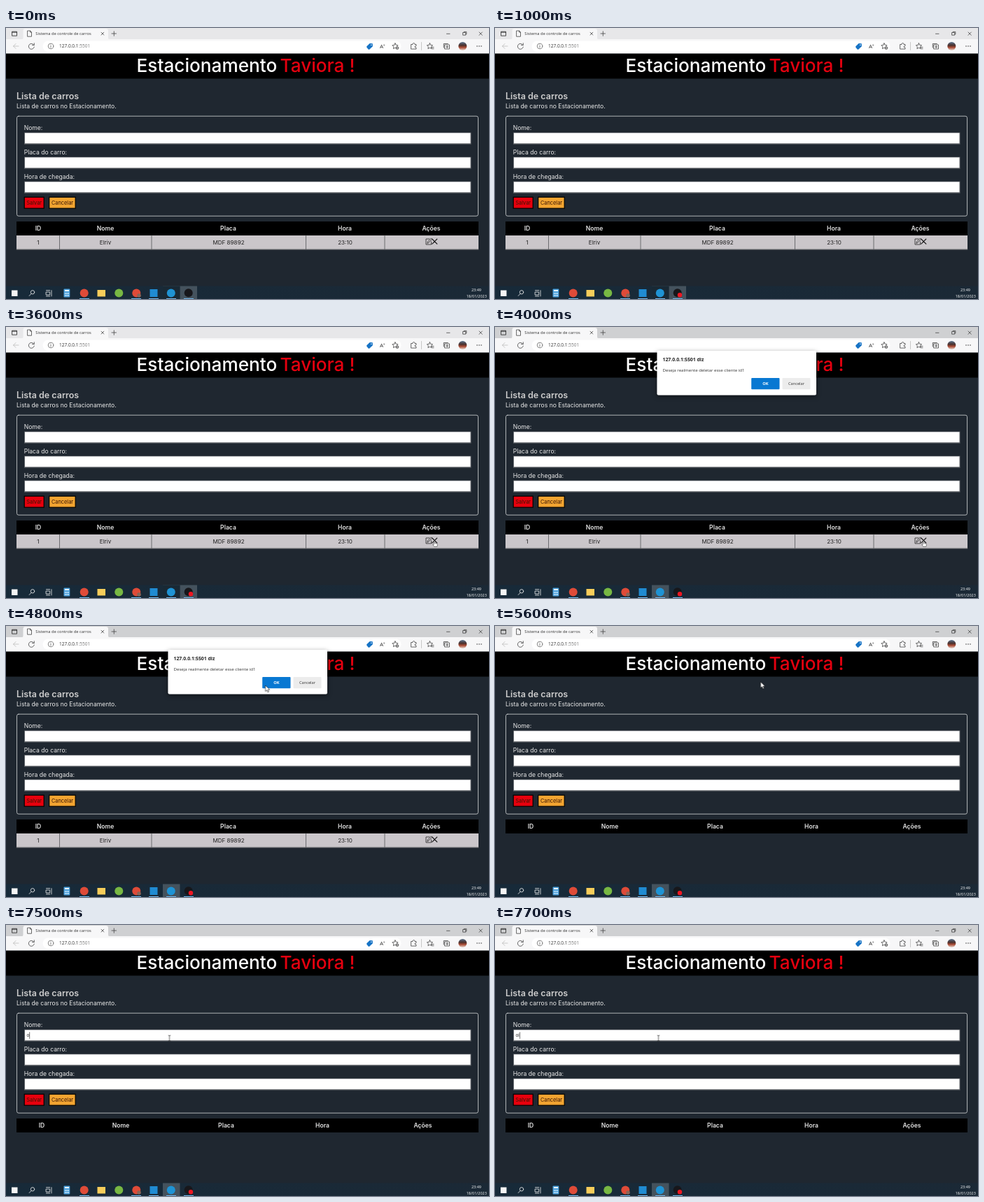
Write an HTML page that moves like this. It is 690x388 px and loops after 8 s.

```html
<!DOCTYPE html>
<html lang="pt-BR">
<head>
<meta charset="utf-8">
<title>Sistema de controle de carros</title>
<style>
  html, body { margin: 0; width: 100%; height: 100%; overflow: hidden; background: #1f2730; }
  svg { display: block; width: 100%; height: 100%; }
  text { font-family: "Open Sans", "Noto Sans", sans-serif; fill: #333; }
  .page text { font-family: Inter, "Open Sans", sans-serif; font-size: 8.6px; fill: #e8e8e8; }
  .page .title { font-size: 26.2px; font-weight: 500; fill: #fff; }
  .page .name { fill: #e3000f; }
  .page .heading { font-size: 12.5px; font-weight: 600; fill: #ccc; }
  .page .head text { font-weight: 600; fill: #e4e4e4; }
  .page .row text { font-size: 8.1px; fill: #222; }
  .page .button { font-size: 7.4px; fill: #3a1505; }
  .mid text, .mid { text-anchor: middle; }
  .line { fill: none; stroke: #444; stroke-width: .8; stroke-linecap: round; stroke-linejoin: round; }
  .pale { stroke: #bbb; }
  .light { stroke: #f2f2f2; }
  .bold { font-weight: 700; }

  /* hard changes */
  .window, .inactive, .before, .after, .badge, .dialog, .pressed, .suggest, .typed, .letter,
  .caret, .arrow, .hand, .beam { animation: 8s step-end infinite; }
  .inactive { animation-name: inactive; }
  .before { animation-name: before; }
  .after { animation-name: after; }
  .badge { animation-name: badge; }
  .dialog { animation-name: dialog; }
  .pressed { animation-name: pressed; }
  .suggest { animation-name: suggest; }
  .typed { animation-name: typed; }
  .letter { animation-name: letter; }
  .caret { animation-name: caret; }
  .arrow { animation-name: arrow; }
  .hand { animation-name: hand; }
  .beam { animation-name: beam; }
  @keyframes inactive { 0% { opacity: 1 } 47.5%, 100% { opacity: 0 } }
  @keyframes before { 0% { opacity: 1 } 67.5%, 100% { opacity: 0 } }
  @keyframes after { 0% { opacity: 0 } 67.5%, 100% { opacity: 1 } }
  @keyframes badge { 0% { opacity: 0 } 1.25%, 100% { opacity: 1 } }
  @keyframes dialog { 0% { opacity: 0 } 50% { opacity: 1 } 67.5%, 100% { opacity: 0 } }
  @keyframes pressed { 0% { opacity: 0 } 65% { opacity: 1 } 67.5%, 100% { opacity: 0 } }
  @keyframes suggest { 0% { opacity: 0 } 78.75% { opacity: 1 } 92.5%, 100% { opacity: 0 } }
  @keyframes typed { 0% { opacity: 0 } 92.5%, 100% { opacity: 1 } }
  @keyframes letter { 0% { opacity: 0 } 95%, 100% { opacity: 1 } }
  @keyframes caret {
    0% { opacity: 0; transform: none } 78.75% { opacity: 1; transform: none }
    88.75% { opacity: 0; transform: none } 92.5% { opacity: 1; transform: translateX(4px) }
    95%, 100% { opacity: 1; transform: translateX(5.8px) }
  }
  @keyframes arrow {
    0% { opacity: 0 } 16.25% { opacity: 1 } 37.5% { opacity: 0 } 51.25% { opacity: 1 } 77.5%, 100% { opacity: 0 }
  }
  @keyframes hand { 0% { opacity: 0 } 37.5% { opacity: 1 } 51.25%, 100% { opacity: 0 } }
  @keyframes beam { 0% { opacity: 0 } 77.5%, 100% { opacity: 1 } }

  .pointer { animation: travel 8s ease-in-out infinite; }
  @keyframes travel {
    0%, 16.25% { transform: translate(420px, 300px) }
    22.5%, 28.75% { transform: translate(370px, 253px) }
    37.5%, 51.25% { transform: translate(612px, 306px) }
    58.75%, 60% { transform: translate(370.5px, 85px) }
    62.5%, 71.25% { transform: translate(379.5px, 80px) }
    77.5%, 100% { transform: translate(233.5px, 162px) }
  }
</style>
</head>
<body>
<svg viewBox="0 0 690 388" xmlns="http://www.w3.org/2000/svg">
  <defs>
    <linearGradient id="bar"><stop stop-color="#172a39"/><stop offset="1" stop-color="#1b2936"/></linearGradient>
    <linearGradient id="photo" x2="0" y2="1">
      <stop stop-color="#5c7590"/><stop offset=".4" stop-color="#49302c"/><stop offset=".65" stop-color="#a94a34"/><stop offset="1" stop-color="#e5d5cc"/>
    </linearGradient>
    <filter id="shadow" x="-10%" y="-20%" width="120%" height="150%">
      <feDropShadow dx="0" dy="2" stdDeviation="3" flood-opacity=".5"/>
    </filter>
    <g id="field">
      <rect x="26" width="638.5" height="17" fill="#5e6267"/>
      <rect x="27" y=".7" width="636.5" height="14.9" fill="#fff"/>
    </g>
  </defs>

  <!-- web page -->
  <rect width="690" height="388" fill="#1f2730"/>
  <g class="page">
    <rect y="36.5" width="690" height="36" fill="#000"/>
    <text class="title" x="186.5" y="63">Estacionamento</text>
    <text class="title name" x="391.5" y="63">Taviora !</text>
    <text class="heading" x="15" y="101.5">Lista de carros</text>
    <text x="15" y="115">Lista de carros no Estacionamento.</text>
    <rect class="line" x="15.5" y="126.2" width="659" height="143" rx="2.5" style="stroke:#d5d7d9"/>
    <text x="25.7" y="145.8">Nome:</text>
    <text x="25.7" y="180.8">Placa do carro:</text>
    <text x="25.7" y="215.8">Hora de chegada:</text>
    <use href="#field" y="149.6"/>
    <use href="#field" y="184.6"/>
    <use href="#field" y="219.6"/>
    <g stroke="#000" stroke-width="1.2">
      <rect x="26.2" y="242.2" width="28" height="16" fill="#e8000d"/>
      <rect x="61.7" y="242.2" width="37.5" height="16" fill="#f3a531"/>
    </g>
    <g class="mid">
      <text class="button" x="40.2" y="252.7">Salvar</text>
      <text class="button" x="80.5" y="252.7">Cancelar</text>
      <rect x="15" y="277" width="660" height="20" fill="#000"/>
      <g class="before">
        <g class="head">
          <text x="46" y="290.2">ID</text><text x="142" y="290.2">Nome</text><text x="317.5" y="290.2">Placa</text>
          <text x="484" y="290.2">Hora</text><text x="607.5" y="290.2">Ações</text>
        </g>
        <rect x="15" y="297" width="660" height="20.3" fill="#cac6ca"/>
        <path class="line" d="M76.5 297v20M208 297v20M428.5 297v20M541 297v20M15 317h660" style="stroke:#55565a"/>
        <g class="row">
          <text x="46" y="309.8">1</text><text x="142" y="309.8">Elriv</text>
          <text x="318" y="309.8">MDF 89892</text><text x="484.5" y="309.8">23:10</text>
        </g>
        <path class="line" d="M605 302h-5v8h7.5v-4M602 308l.5-2 5-5 1.3 1.3-5 5z" style="stroke:#222"/>
        <path class="line" d="M608.8 302.2l7 7m0-7l-7 7" style="stroke:#111;stroke-width:1.2"/>
      </g>
      <g class="after head">
        <text x="51" y="290.2">ID</text><text x="164" y="290.2">Nome</text><text x="314.5" y="290.2">Placa</text>
        <text x="452" y="290.2">Hora</text><text x="595.5" y="290.2">Ações</text>
      </g>
    </g>
  </g>
  <g class="typed" font-size="7">
    <text x="29.4" y="160.2" style="font-family:'Liberation Sans',sans-serif">o<tspan class="letter">i</tspan></text>
  </g>
  <path class="caret" d="M29.7 153.3v9.6" stroke="#333" stroke-width=".7"/>

  <!-- browser frame -->
  <rect width="690" height="17" fill="#cfd0d2"/>
  <rect class="inactive" width="690" height="17" fill="#e7e7e9"/>
  <rect y="16" width="690" height="20.5" fill="#f7f7f8"/>
  <path d="M22 16.5q2.5 0 2.5-3V4q0-3 3-3H143q3 0 3 3v9.5q0 3 2.5 3z" fill="#f7f7f8"/>
  <path class="line" d="M9 5.2h6.5v6H9zM9 6.2h6.5" style="stroke:#222"/>
  <path class="line" d="M31 4h3.5l2 2v6.2H31zM34.5 4v2h2"/>
  <text x="42.3" y="10.4" font-size="5.75">Sistema de controle de carros</text>
  <path class="line" d="M136 6.2l3.8 3.8m0-3.8l-3.8 3.8M151 8h6.5M154.3 4.8v6.5"/>
  <path class="line" d="M629.5 8.3h4.5M653 6.5h3.7v3.7H653zM654.2 6.2v-.8h3.6V9h-.8M676 6l4.3 4.3m0-4.3L676 10.3"/>
  <rect x="52.5" y="18.5" width="512" height="15.5" rx="7.5" fill="#fff"/>
  <path class="line pale" d="M18 26h-7.5m3.5-3.5L10.5 26l3.5 3.5"/>
  <path class="line" d="M39.8 24.3a4 4 0 1 0 .5 2.8M40.3 21.8v2.8h-2.8"/>
  <g class="line" style="stroke:#666"><circle cx="64" cy="26" r="3.8"/><path d="M64 25.5v2.5M64 24v.1"/></g>
  <text x="76" y="28.4" font-size="6.5">127.0.0.1<tspan fill="#777">:5501</tspan></text>
  <path d="M515.5 26l4.2-4 4 .3.2 4-4.5 4.2q-1 .8-1.8 0l-2.1-2.4q-.8-1 0-2.1z" fill="#1673c5"/>
  <circle cx="521.8" cy="24.2" r=".8" fill="#fff"/>
  <text x="534" y="29" font-size="8" fill="#777">A<tspan dy="-3" font-size="5">»</tspan></text>
  <path id="star" class="line" d="M556 21.8l1.2 2.6 2.9.4-2.1 2 .5 2.9-2.5-1.4-2.6 1.4.5-2.9-2.1-2 2.9-.4z"/>
  <circle cx="559" cy="28.6" r="2.2" fill="#555"/>
  <path class="line" d="M558 28.6h2M559 27.6v2" style="stroke:#fff;stroke-width:.6"/>
  <path class="line" d="M579 23.5h2q0-2 1.5-2t1.5 2h2v2.2q-2 0-2 1.2t2 1.2v2h-7z"/>
  <path class="line pale" d="M593.5 20.5v11"/>
  <use href="#star" x="49.5"/>
  <path class="line" d="M607.5 27.5h3.5M608.5 29.7h2.5"/>
  <path class="line" d="M627 24h6.5v6H627zM625.3 28v-5.5h6M628.6 27h3.3M630.2 25.4v3.3"/>
  <circle cx="652.3" cy="26" r="6" fill="url(#photo)"/>
  <g fill="#444"><circle cx="673" cy="26" r=".8"/><circle cx="676" cy="26" r=".8"/><circle cx="679" cy="26" r=".8"/></g>

  <!-- name suggestions -->
  <g class="suggest">
    <rect x="26" y="166.5" width="203" height="99.5" rx="1.5" fill="#fff" filter="url(#shadow)"/>
    <text x="32" y="177.3" font-size="5.27" style="fill:#777">Digite '/' para pesquisar a partir das suas informações salvas</text>
    <path class="line" d="M219 173.3l4.2 4.2m0-4.2l-4.2 4.2"/>
    <g class="bold" font-size="5.8">
      <text x="32.5" y="196">wete</text>
      <text x="32.5" y="215.2">500MBps elrivtanso</text>
      <text x="32.5" y="234.4">500MBps</text>
    </g>
    <path d="M26 244.5h203" stroke="#ddd" stroke-width=".8"/>
    <circle class="line" cx="35" cy="253.3" r="1.7"/>
    <path class="line" d="M36 258.5h-3.7q0-2.5 2.8-2.5M36.5 256.5h2.6v2.3h-2.6z"/>
    <text x="45.4" y="257.6" font-size="5.7">Gerenciar informações pessoais</text>
  </g>

  <!-- confirmation -->
  <g class="dialog">
    <rect x="231.5" y="34" width="227.5" height="63.5" rx="2" fill="#fff" filter="url(#shadow)"/>
    <text class="bold" x="239.5" y="49.3" font-size="6.9" style="fill:#222">127.0.0.1:5501 diz</text>
    <text x="239.5" y="63.6" font-size="6.13">Deseja realmente deletar esse cliente id1</text>
    <rect x="366.2" y="73" width="40.3" height="16.3" rx="1" fill="#0878d2"/>
    <rect class="pressed" x="366.2" y="73" width="40.3" height="16.3" rx="1" fill="#3e95dc"/>
    <rect x="410.5" y="73" width="40" height="16.3" rx="1" fill="#ececec"/>
    <g class="mid" font-size="5.7">
      <text class="bold" x="386.3" y="83.3" style="fill:#fff">OK</text>
      <text x="430.5" y="83.3">Cancelar</text>
    </g>
  </g>

  <!-- taskbar -->
  <rect y="369.5" width="690" height="18.5" fill="url(#bar)"/>
  <rect class="inactive" x="248.5" y="369.5" width="24.5" height="18.5" fill="#44525d"/>
  <rect class="typed-tab after-click" x="224" y="369.5" width="24.5" height="18.5" fill="#44525d"/>
  <rect class="inactive" x="224" y="369.5" width="24.5" height="18.5" fill="#192935"/>
  <path d="M105 387.5h14M179 387.5h14M204 387.5h14M229 387.5h14M254 387.5h14" stroke="#76b9ed"/>
  <rect x="8" y="375.5" width="8.5" height="8.5" fill="#f5f5f5"/>
  <g class="line light"><circle cx="38" cy="378.3" r="2.7"/><path d="M36 380.5l-2.8 3M57.5 378h5.2v4h-5.2zM57.5 375.7h5.2M57.5 384h5.2M65 375.7v8.3"/></g>
  <rect x="82.5" y="373.5" width="8.8" height="12" rx="1" fill="#4ba0dc"/>
  <path d="M84 376h6" stroke="#e8f5ff" stroke-width="2"/>
  <path d="M84 380h6M84 383h6" stroke="#e8f5ff" stroke-width="1.5" stroke-dasharray="1.5 .7"/>
  <circle cx="111.7" cy="379.5" r="6" fill="#df4b38"/>
  <rect x="130.5" y="375" width="11.5" height="9.5" fill="#f7cd5a"/>
  <circle cx="161.3" cy="379.5" r="6" fill="#78b843"/>
  <circle cx="186.3" cy="379.5" r="6" fill="#df4b38"/>
  <circle cx="190" cy="383" r="2.8" fill="#8b6557"/>
  <rect x="205.5" y="374" width="11" height="11" fill="#208bd2"/>
  <circle cx="235.8" cy="379.5" r="6" fill="#1f93d4"/>
  <circle cx="260.7" cy="379.3" r="6" fill="#17171b"/>
  <circle class="badge" cx="264" cy="382.2" r="3.2" fill="#ee1722"/>
  <g class="mid" font-size="5.5">
    <text x="672" y="377.2" style="fill:#fff">23:49</text>
    <text x="672.3" y="386.2" style="fill:#fff">18/01/2023</text>
  </g>

  <!-- mouse pointer -->
  <g class="pointer">
    <path class="arrow" d="M0 0v8.6l2-1.8 1.4 3.1 1.5-.7-1.4-3h2.7z" fill="#fff" stroke="#111" stroke-width=".6"/>
    <path class="hand" d="M-.7.6q.7-1 1.4 0v3l3 .7q.8.3.7 1.2l-.6 3H-.2L-2.4 5.3q.1-1 1.7.2z" fill="#fff" stroke="#222" stroke-width=".5"/>
    <path class="line beam" d="M-1.3-4q1.3 0 1.3.6 0-.6 1.3-.6M0-3.4v7M-1.3 4.2Q0 4.2 0 3.6q0 .6 1.3.6" style="stroke:#222;stroke-width:.7"/>
  </g>
</svg>
</body>
</html>
```
